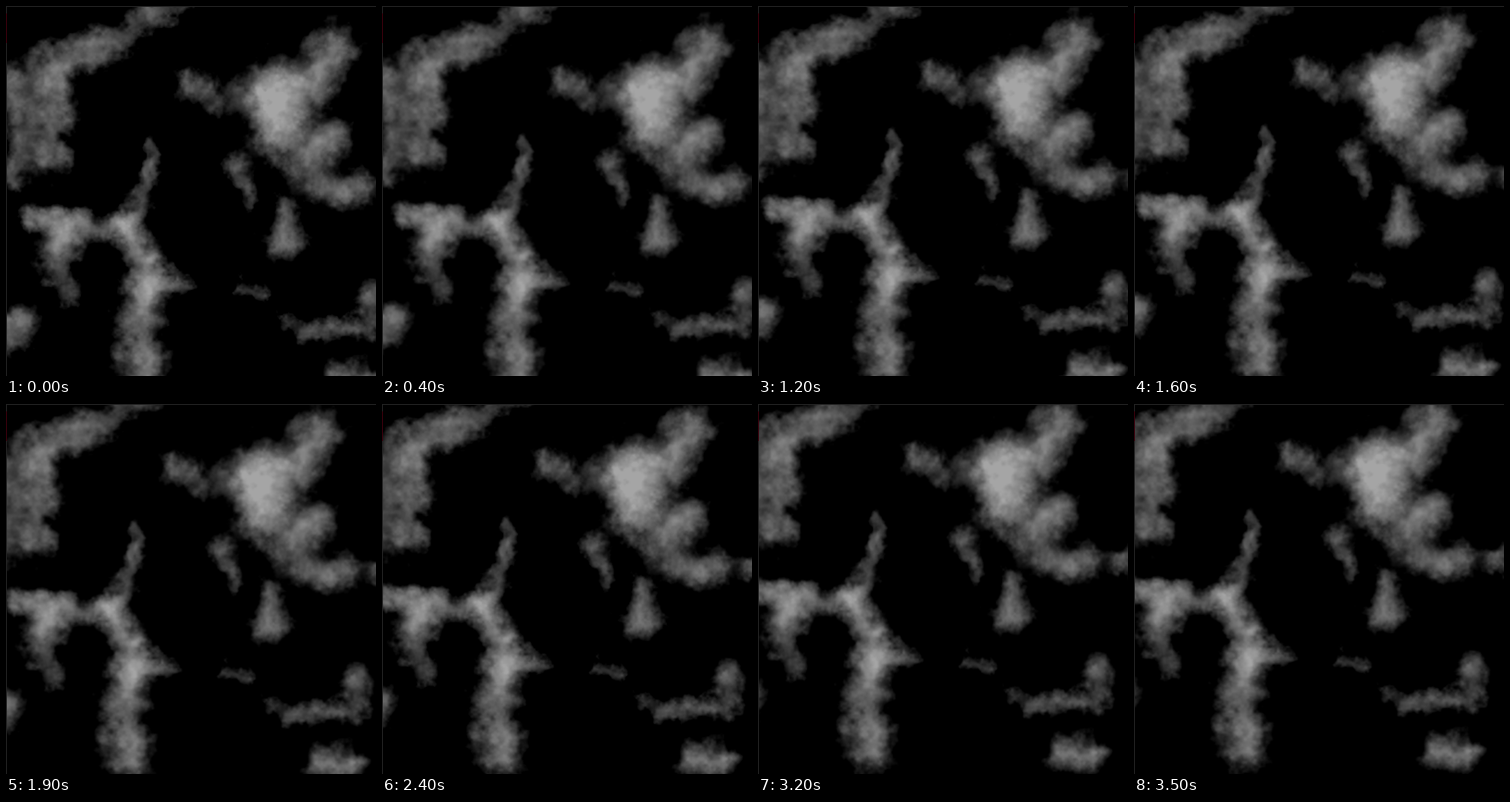
These frames come from a looping animation (400x400 px, 3600 ms). An HTML page with a canvas:

```html
<!DOCTYPE html>
<html lang="en">
<head>
<meta charset="utf-8">
<title>Drifting clouds</title>
<style>
  html, body { margin: 0; width: 100%; height: 100%; overflow: hidden; background: #000; }
  #stage { position: relative; width: 400px; height: 400px; overflow: hidden; }
  #clouds { position: absolute; left: 0; top: 0; }
  #edge { position: absolute; inset: 0; border: solid #222; border-width: 1px 0 0 1px; }
  #tint { position: absolute; left: 0; top: 8px; width: 1px; height: 32px; background: #3a000c; }
</style>
</head>
<body>
<div id="stage">
  <canvas id="clouds" width="432" height="432"></canvas>
  <div id="edge"></div>
  <div id="tint"></div>
</div>
<script>
const SIZE = 432;
const canvas = document.getElementById('clouds');

const mix = (a, b, t) => a + (b - a) * t;
const clamp = (v, lo, hi) => Math.min(hi, Math.max(lo, v));
const smooth = t => t * t * (3 - 2 * t);

// A bank of cloud follows a path; its radius tapers from start to end.
function bank(startRadius, endRadius, ...points) {
  const last = points.length - 1;
  const radius = i => mix(startRadius, endRadius, i / last);
  return points.slice(1).map(([x, y], i) => {
    const [x0, y0] = points[i];
    const dx = x - x0, dy = y - y0;
    return { x0, y0, dx, dy, length2: dx * dx + dy * dy, r0: radius(i), r1: radius(i + 1) };
  });
}

const banks = [
  bank(16, 29, [195, 2], [150, 10], [132, 38], [92, 45], [50, 60], [46, 160]),
  bank(23, 14, [8, 85], [10, 195]),
  bank(19, 20, [194, 80], [230, 102]),
  bank(30, 27, [352, 45], [337, 85], [293, 98], [290, 138], [320, 166], [352, 138]),
  bank(37, 37, [290, 90], [297, 118]),
  bank(24, 24, [350, 200], [380, 197]),
  bank(20, 20, [424, 199], [440, 199]),
  bank(17, 13, [248, 175], [262, 208]),
  bank(15, 29, [302, 216], [300, 248]),
  bank(11, 33, [155, 150], [155, 184], [148, 213], [130, 240], [150, 276], [142, 328], [148, 400]),
  bank(32, 11, [60, 249], [48, 278], [70, 320]),
  bank(13, 15, [26, 228], [125, 240]),
  bank(19, 14, [150, 298], [195, 303]),
  bank(13, 11, [250, 303], [275, 308]),
  bank(11, 20, [298, 335], [325, 348], [390, 348], [398, 312]),
  bank(23, 23, [354, 403], [382, 403]),
  bank(27, 25, [5, 356], [14, 340])
];

function hash(x, y) {
  let h = Math.imul(x, 374761393) ^ Math.imul(y, 668265263);
  h = Math.imul(h ^ (h >>> 13), 1274126177);
  return ((h ^ (h >>> 16)) >>> 0) / 4294967296;
}

function valueNoise(x, y) {
  const ix = Math.floor(x), iy = Math.floor(y);
  const u = smooth(x - ix), v = smooth(y - iy);
  return mix(mix(hash(ix, iy), hash(ix + 1, iy), u),
             mix(hash(ix, iy + 1), hash(ix + 1, iy + 1), u), v);
}

// Layered noise centred on zero
function fractal(x, y, cell) {
  let sum = 0;
  for (let octave = 0, amp = 1; octave < 4; octave++, cell /= 2, amp *= 0.62) {
    sum += amp * (valueNoise(x / cell + octave * 31, y / cell + octave * 17) - 0.5);
  }
  return sum;
}

function segmentDensity(x, y, s) {
  const px = x - s.x0, py = y - s.y0;
  const t = clamp((px * s.dx + py * s.dy) / s.length2, 0, 1);
  const r = mix(s.r0, s.r1, t);
  const q = ((px - s.dx * t) ** 2 + (py - s.dy * t) ** 2) / (r * r);
  return q > 6 ? 0 : Math.min(0.85, 0.35 + r / 70) * Math.exp(-q);
}

function density(x, y) {
  let clear = 1;
  for (const segments of banks) {
    let thickest = 0;
    for (const s of segments) thickest = Math.max(thickest, segmentDensity(x, y, s));
    clear *= 1 - thickest;
  }
  return 1 - clear;
}

function cloudGrey(x, y) {
  const body = density(x + 12 * fractal(x + 500, y, 20), y + 12 * fractal(x, y + 500, 20));
  const rough = 0.24 * fractal(x, y, 26) * Math.min(1, body * 4);
  return clamp((body - 0.31 + rough) * 240, 0, 165);
}

function paintClouds() {
  const ctx = canvas.getContext('2d');
  const image = ctx.createImageData(SIZE, SIZE);
  for (let y = 0, i = 0; y < SIZE; y++) {
    for (let x = 0; x < SIZE; x++, i += 4) {
      image.data.fill(cloudGrey(x, y), i, i + 3);
      image.data[i + 3] = 255;
    }
  }
  ctx.putImageData(image, 0, 0);
}

paintClouds();

// Steady drift in 100 ms steps, with a pause from PAUSE to RESUME and at the end.
const LOOP = 3600, STEP = 100, PAUSE = 2400, RESUME = 2900, END = 3400;

function driftKey(time, easing, moved = time) {
  return {
    offset: time / LOOP,
    transform: `translate(${-0.0087 * moved}px, ${-0.0083 * moved}px)`,
    easing
  };
}

canvas.animate([
  driftKey(0, `steps(${PAUSE / STEP}, end)`),
  driftKey(PAUSE, 'steps(1, end)'),
  driftKey(RESUME, `steps(${(END - RESUME) / STEP}, end)`),
  driftKey(END, 'steps(1, end)'),
  driftKey(LOOP, 'linear', END)
], { duration: LOOP, iterations: Infinity });
</script>
</body>
</html>
```
